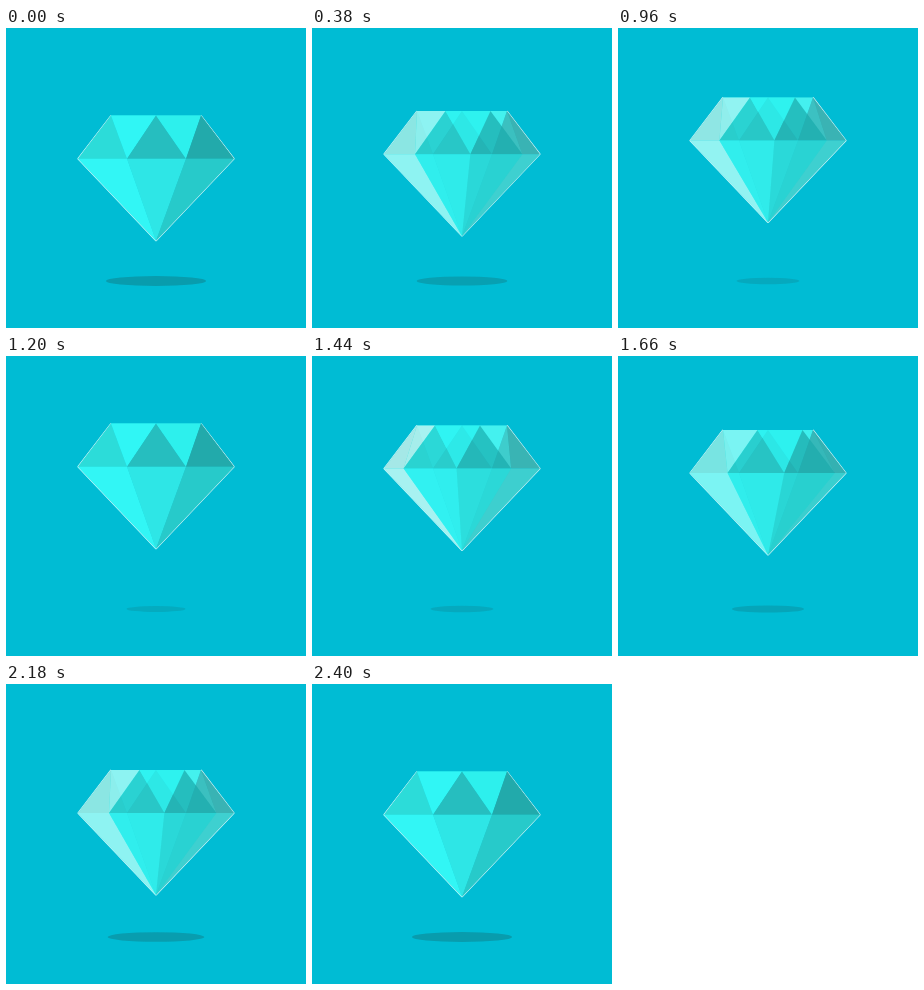
Animation, 300 px wide and 300 px high, one loop 2420 ms. Source, as an HTML page with a canvas:

```html
<!DOCTYPE html>
<html lang="en">
<head>
<meta charset="utf-8">
<title>Floating diamond</title>
<style>
  html, body { margin: 0; width: 100%; height: 100%; overflow: hidden; background: #00bcd4; }
  canvas { display: block; width: 300px; height: 300px; }
</style>
</head>
<body>
<canvas id="stage" width="300" height="300"></canvas>
<script>
const ctx = document.getElementById('stage').getContext('2d');
const LOOP = 2420, BOB = 2400, STEP = 600, TICK = 20;
const TOP = 87.6, GIRDLE = 130.7, TIP = [150, 212.7];
const SIDES = [[105, TOP], [72, GIRDLE], TIP, [228, GIRDLE], [195, TOP]];
const SHINE = [240, 240, 240];

const lerp = (a, b, p) => a + (b - a) * p;
const mix = (a, b, p) => a.map((v, i) => lerp(v, b[i], p));

// Facets enter nearly white on the left and pale while they leave on the right.
const ramp = (...colors) => [SHINE, ...colors, mix(colors[colors.length - 1], SHINE, 0.6)];
const UPPER = ramp([44, 221, 218], [38, 191, 192], [34, 171, 172]);
const CROWN = ramp([48, 247, 246], [46, 240, 238]);
const LOWER = ramp([51, 247, 246], [47, 231, 230], [39, 203, 203]);

function trace(points) {
  ctx.beginPath();
  points.forEach(([x, y]) => ctx.lineTo(x, y));
}

// Each point slides to the next point's place as p goes from 0 to 1.
function slide(points, p) {
  const last = points.length - 1;
  const moved = points.slice(0, last).map((x, i) => lerp(x, points[i + 1], p));
  return [points[0], ...moved, points[last]];
}

function drawFacets(p, alpha) {
  const girdle = slide([72, 121, 180, 228], p);
  const top = slide([105, 150, 195], p);
  const facet = (colors, i, ...points) => {
    const entering = i === 0, leaving = i === colors.length - 2;
    const rgb = mix(colors[i], colors[i + 1], entering ? 1 - Math.sqrt(1 - p) : p);
    ctx.fillStyle = `rgba(${rgb.map(Math.round)}, ${leaving ? alpha * (1 - p) : alpha})`;
    trace(points);
    ctx.fill();
  };
  for (let i = 0; i < 4; i++) {
    const left = [girdle[i], GIRDLE], right = [girdle[i + 1], GIRDLE];
    facet(UPPER, i, left, [top[i], TOP], right);
    facet(LOWER, i, left, right, TIP);
    if (i < 3) facet(CROWN, i, [top[i], TOP], [top[i + 1], TOP], right);
  }
}

function drawShadow(lift) {
  const scale = 1 - 0.41 * lift;
  ctx.fillStyle = `rgba(32, 64, 64, ${lerp(0.26, 0.14, lift)})`;
  ctx.beginPath();
  ctx.ellipse(150, 253, 50 * scale, 5 * scale, 0, 0, 2 * Math.PI);
  ctx.fill();
}

function draw(now) {
  const time = Math.floor(now % LOOP / TICK) * TICK;
  const lift = (1 - Math.cos(2 * Math.PI * time / BOB)) / 2;
  ctx.fillStyle = '#00bcd4';
  ctx.fillRect(0, 0, 300, 300);
  drawShadow(lift);

  ctx.save();
  ctx.translate(0, -20 * lift);
  trace(SIDES);
  ctx.strokeStyle = 'rgba(255, 255, 255, 0.85)';
  ctx.lineWidth = 1.3;
  ctx.lineJoin = 'bevel';
  ctx.stroke();
  drawFacets(1, 1);
  drawFacets(time % STEP / STEP, 0.8);
  ctx.restore();
  requestAnimationFrame(draw);
}
requestAnimationFrame(draw);
</script>
</body>
</html>
```
